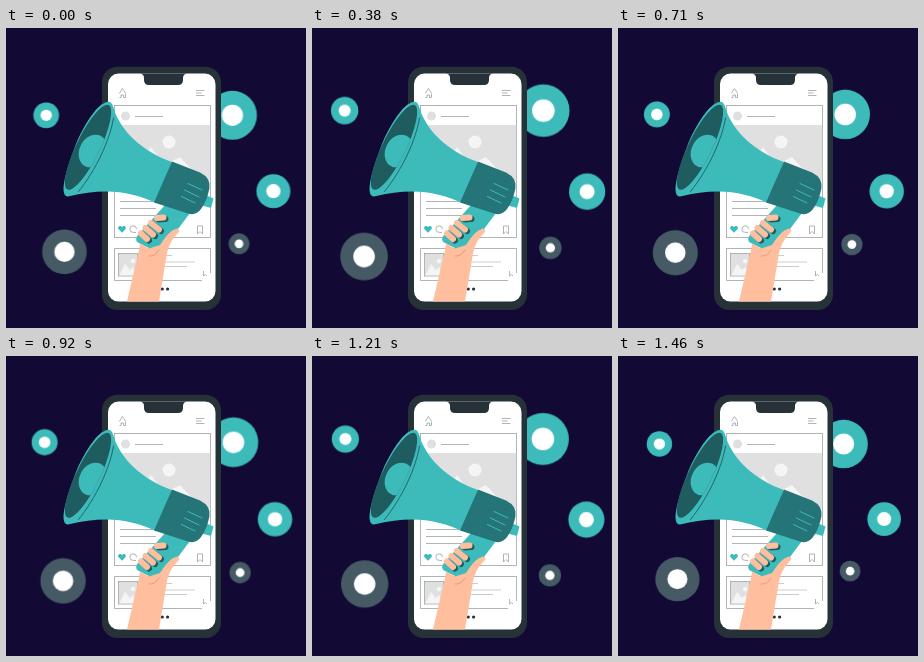
Write an HTML page that moves like this. It is 300 by 300 pixels and loops after 1.5 s.

```html
<!DOCTYPE html>
<html lang="en">
<head>
<meta charset="utf-8">
<title>Megaphone and phone</title>
<style>
  html, body { margin: 0; width: 100%; height: 100%; overflow: hidden; background: #120a35; }
  svg { display: block; width: 100vw; height: 100vh; }
  .badges {
    transform-origin: 152px 155px;
    animation: beat 1.5s linear -35ms infinite;
  }
  @keyframes beat {
    0%, 59%, 100% { transform: scale(1); }
    20%, 77% { transform: scale(1.1); }
  }
  .teal { fill: #3dbbbb; }
  .deep { fill: #257478; }
  .hollow { fill: #1f5c60; }
  .slate { fill: #455a64; }
  .dark { fill: #263238; }
  .grey { fill: #e0e0e0; }
  .pale { fill: #f5f5f5; }
  .white { fill: #fff; }
  .skin { fill: #ffbe9d; }
  .line { fill: none; stroke: #8d9498; stroke-width: .7; }
  .soft { fill: none; stroke: #c4c8ca; stroke-width: .9; }
  .seam { fill: none; stroke: #1f5c60; stroke-width: .9; stroke-linecap: round; }
  .rib { fill: none; stroke: #3dbbbb; stroke-width: 1; stroke-linecap: round; }
  .crease { fill: none; stroke: #d98c72; stroke-width: .7; stroke-linecap: round; }
  .finger { fill: none; stroke: #ffbe9d; stroke-width: 6; stroke-linecap: round; }
  .shade { fill: none; stroke: #1f5c60; stroke-width: 6; stroke-linecap: round; }
</style>
</head>
<body>
<svg viewBox="0 0 300 300">
  <defs>
    <ellipse id="rim" cx="82" cy="119.300" rx="11.800" ry="47" transform="rotate(26 82 119.300)"/>
    <clipPath id="mouth"><use href="#rim"/></clipPath>
    <path id="fingers" d="M135 205.500L141 211M139.500 200L147 206.500M145 195L153 201.500M151 190L157.500 189.500"/>
  </defs>
  <rect width="300" height="300" fill="#120a35"/>

  <g class="badges">
    <circle class="teal" cx="41.5" cy="88" r="12.7"/>
    <circle class="white" cx="41.5" cy="88" r="5.6"/>
    <circle class="teal" cx="225.5" cy="88" r="24.2"/>
    <circle class="white" cx="225.5" cy="88" r="10.5"/>
    <circle class="teal" cx="266" cy="163" r="16.8"/>
    <circle class="white" cx="266" cy="163" r="7"/>
    <circle class="slate" cx="59.5" cy="223" r="22.1"/>
    <circle class="white" cx="59.5" cy="223" r="10"/>
    <circle class="slate" cx="232" cy="215" r="10.4"/>
    <circle class="white" cx="232" cy="215" r="4.3"/>
  </g>

  <g id="phone">
    <rect class="dark" x="96" y="38.700" width="119" height="243.300" rx="15.500"/>
    <rect class="white" x="102" y="45.600" width="107.500" height="227.900" rx="10.500"/>
    <path class="dark" d="M134 45.500Q138 46 138 50V52Q138 57 143 57H172Q177 57 177 52V50Q177 46 181 45.500Z"/>

    <path class="line" d="M113.300 65.500L116.300 60.500L119.500 65M119.500 65.500V69.500H117.500V67H115V69.500H113.500"/>
    <path class="line" d="M190 62.500H198.500M190 65H195.500M190 67.500H198.500"/>

    <rect class="line" x="108.500" y="77.500" width="96" height="132"/>
    <circle class="grey" cx="119.500" cy="88" r="4.500"/>
    <path class="line" d="M129 88.500H157"/>
    <rect class="grey" x="109" y="97" width="95.200" height="56"/>
    <circle class="pale" cx="163" cy="114" r="6.500"/>
    <path class="pale" d="M124 153L145 119L158 137L174 129L196 153Z"/>
    <path class="line" d="M114 173.500H150M114 180.500H150M114 187.500H150"/>
    <path class="teal" d="M116 204.800L112.600 201.300C110.800 198.800 114.500 196.400 116 199.200C117.500 196.400 121.200 198.800 119.400 201.300Z"/>
    <path class="line" d="M130 204.500L127.500 204.400A3.300 3.300 0 1 1 130.500 201.200"/>
    <path class="line" d="M191.500 198H196.500V206L194 203.500L191.500 206Z"/>

    <path class="line" d="M204.500 245V220.500H108.500V252.500H196"/>
    <rect class="line" x="112.500" y="225.500" width="19" height="22.500"/>
    <rect class="grey" x="113" y="226" width="18" height="21.500"/>
    <circle class="pale" cx="127" cy="233" r="2.200"/>
    <path class="pale" d="M113.500 247L119 236L124 242L127 239L131 247Z"/>
    <path class="soft" d="M156 227.500H166M156 234H189M156 238.500H181"/>
    <path class="line" d="M197.500 243V248L199.500 246.500L201 248"/>
    <circle class="dark" cx="156.300" cy="261" r="1.600"/>
    <circle class="dark" cx="161.600" cy="261" r="1.600"/>
  </g>

  <g id="megaphone">
    <path class="teal" d="M195 165L207.500 170.500L205 180L194 177Z"/>
    <path class="teal" d="M160 176L184 185L166 209L153 219Q148 223 143 220L132 214.500Q128 212 132 207Z"/>
    <path class="teal" d="M104 74C107 75 108 83 111 89C120 107 138 124 166 134L150 175C126 164 100 159 62 168.500C54 168 57 150 70 116C82 88 96 72 104 74Z"/>
    <use class="hollow" href="#rim"/>
    <g clip-path="url(#mouth)">
      <ellipse class="teal" cx="86.800" cy="123" rx="13.300" ry="17" transform="rotate(27 86.800 123)"/>
    </g>
    <path class="seam" d="M107.500 90C104 112 90 142 72.500 163.500"/>
    <path class="deep" d="M166 133.500L194 144.500Q205 150 203.500 160Q201 173 195 181Q190 188 182 185.500L148 174.500Z"/>
    <path class="rib" d="M182 155.500L196 162M178.500 162L193 169M175.500 168.500L189 175"/>
  </g>

  <g id="hand">
    <use class="shade" href="#fingers" x="2" y="1.500"/>
    <path class="skin" d="M121 273.500L132 226Q133.500 222 134 215.500L143 220.500L154 217C158 211 164 202 171 200.500Q175 201.500 172 205C166 211 162 218 160.500 228L153 273.500Z"/>
    <use class="finger" href="#fingers"/>
    <path class="crease" d="M143 228Q149 229 153 222"/>
  </g>
</svg>
</body>
</html>
```
